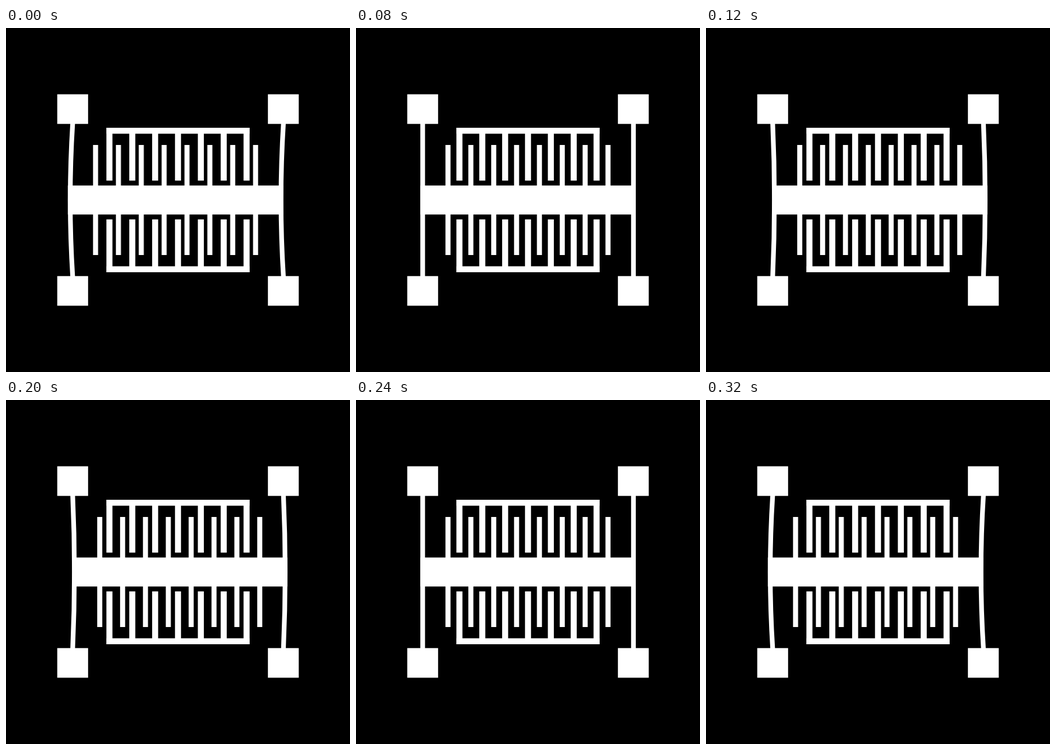
Recreate the animation shown at these times as an HTML page. Size 600x600 px, loop 360 ms.

```html
<!DOCTYPE html>
<html lang="en">
<head>
<meta charset="utf-8">
<title>Comb resonator</title>
<style>
  html, body { margin: 0; width: 100%; height: 100%; overflow: hidden; background: #000; }
  svg { display: block; width: 100%; height: 100%; fill: #fff; }
  .beam { fill: none; stroke: #fff; stroke-width: 8.2; }
</style>
</head>
<body>
<svg id="stage" viewBox="0 0 600 600"></svg>
<script>
const stage = document.getElementById('stage');
const STEP = 40, STEPS = 9, AMPLITUDE = 4.25, PITCH = 39.87;

function add(parent, tag, attrs = {}) {
  const el = document.createElementNS('http://www.w3.org/2000/svg', tag);
  for (const key in attrs) el.setAttribute(key, attrs[key]);
  return parent.appendChild(el);
}

function box(parent, x1, y1, x2, y2) {
  return add(parent, 'rect', { x: x1, y: y1, width: x2 - x1, height: y2 - y1 });
}

// Draws a box and its reflection below the horizontal axis.
function mirrored(parent, x1, y1, x2, y2) {
  box(parent, x1, y1, x2, y2);
  box(parent, x1, 600 - y2, x2, 600 - y1);
}

function comb(parent, count, width, top, bottom) {
  for (let i = 0; i < count; i++) {
    const x = 300 + (i - (count - 1) / 2) * PITCH;
    mirrored(parent, x - width / 2, top, x + width / 2, bottom);
  }
}

const beamPath = (x, bend) => `M ${x} 166 Q ${x + 2 * bend} 300 ${x} 434`;

// One swing in eight even phases; the last phase is held twice as the loop restarts.
function play(el, frameAt) {
  const frames = Array.from({ length: STEPS + 1 }, (_, i) => {
    const shift = -AMPLITUDE * Math.cos((i % STEPS) * Math.PI / 4);
    return { ...frameAt(shift), offset: i / STEPS, easing: 'step-end' };
  });
  el.animate(frames, { duration: STEP * STEPS, iterations: Infinity });
}

// Fixed anchors and combs
mirrored(stage, 89.4, 115.6, 143.2, 167.3);
mirrored(stage, 456.8, 115.6, 510.6, 167.3);
mirrored(stage, 175.2, 174, 424.8, 184.4);
comb(stage, 7, 10.5, 174, 266.2);

// Moving plate with its fingers
const plate = add(stage, 'g');
box(plate, 112.3, 274.7, 487.7, 325.3);
comb(plate, 8, 8.8, 204, 275);
play(plate, shift => ({ transform: `translateX(${shift}px)` }));

// Flexing beams
for (const x of [116.3, 483.9]) {
  const beam = add(stage, 'path', { class: 'beam', d: beamPath(x, -AMPLITUDE) });
  play(beam, shift => ({ d: `path("${beamPath(x, shift)}")` }));
}
</script>
</body>
</html>
```
